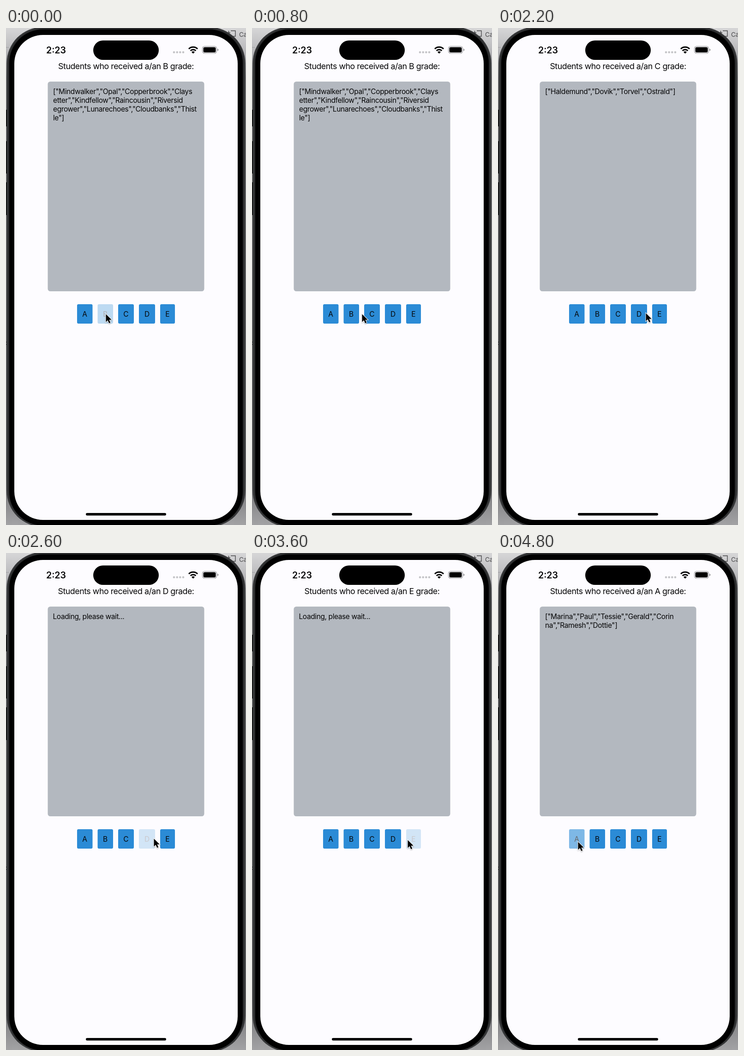
Write an HTML page that moves like this. It is 520 px wide and 1076 px high and loops after 5 s.

```html
<!DOCTYPE html>
<html lang="en">
<head>
<meta charset="utf-8">
<title>Grades</title>
<style>
  html, body { margin: 0; width: 100%; height: 100%; overflow: hidden; background: #222; }
  svg { display: block; width: 520px; height: 1076px; }
  text { font-family: Inter, "Open Sans", sans-serif; fill: #050506; white-space: pre; }
  .title text { font-size: 17.8px; letter-spacing: -.47px; text-anchor: middle; }
  .list text { font-size: 15.5px; letter-spacing: -.4px; }
  .clock { font-size: 19.5px; font-weight: 600; }
  .btn rect { fill: #2b8bd6; }
  .btn text { font-size: 15.5px; text-anchor: middle; }

  .anim, .title text, .list g { animation: 5s step-end infinite; }
  .title text, .list g { visibility: hidden; }
  #cursor { animation-name: move; }

  /* press: touch fades in, holds, releases; tap and touch are quicker */
  #b { animation-name: press; }
  #c { animation-name: press; animation-delay: -3.8s; }
  #d { animation-name: press; animation-delay: -2.6s; }
  #e { animation-name: touch; animation-delay: -1.6s; }
  #a { animation-name: tap; animation-delay: -.4s; }
  @keyframes press { 0% { opacity: .3 } 4% { opacity: .2 } 8% { opacity: .6 } 12%, 100% { opacity: 1 } }
  @keyframes touch { 0% { opacity: .3 } 4% { opacity: .2 } 8%, 100% { opacity: 1 } }
  @keyframes tap { 0% { opacity: .2 } 4% { opacity: .6 } 8%, 100% { opacity: 1 } }

  .title .b { animation-name: title-b; }
  .title .c { animation-name: title-c; }
  .title .d { animation-name: title-d; }
  .title .e { animation-name: title-e; }
  .title .a { animation-name: title-a; }
  @keyframes title-b { 0% { visibility: visible } 28%, 100% { visibility: hidden } }
  @keyframes title-c { 28% { visibility: visible } 52%, 100% { visibility: hidden } }
  @keyframes title-d { 52% { visibility: visible } 72%, 100% { visibility: hidden } }
  @keyframes title-e { 72% { visibility: visible } 92%, 100% { visibility: hidden } }
  @keyframes title-a { 92%, 100% { visibility: visible } }

  .list .wait { animation-name: wait; }
  .list .b { animation-name: list-b; }
  .list .c { animation-name: list-c; }
  .list .d { animation-name: list-d; }
  .list .e { animation-name: list-e; }
  .list .a { animation-name: list-a; }
  @keyframes wait {
    4%, 28%, 52%, 72%, 92% { visibility: visible }
    0%, 8%, 32%, 56%, 76%, 96%, 100% { visibility: hidden }
  }
  @keyframes list-b { 0%, 8% { visibility: visible } 4%, 28%, 100% { visibility: hidden } }
  @keyframes list-c { 32% { visibility: visible } 52%, 100% { visibility: hidden } }
  @keyframes list-d { 56% { visibility: visible } 72%, 100% { visibility: hidden } }
  @keyframes list-e { 76% { visibility: visible } 92%, 100% { visibility: hidden } }
  @keyframes list-a { 96%, 100% { visibility: visible } }

  @keyframes move {
    0% { transform: translate(216px, 619px) }
    16% { transform: translate(238px, 619px) }
    20% { transform: translate(253px, 620px) }
    24% { transform: translate(270px, 620px) }
    36% { transform: translate(311px, 619px) }
    40% { transform: translate(318px, 618px) }
    44% { transform: translate(320px, 617px) }
    48% { transform: translate(320px, 618px) }
    60% { transform: translate(340px, 620px) }
    64% { transform: translate(337px, 621px) }
    76% { transform: translate(298px, 620px) }
    80% { transform: translate(199px, 620px) }
    84% { transform: translate(187px, 622px) }
    88%, 100% { transform: translate(173px, 625px) }
  }
</style>
</head>
<body>
<svg viewBox="0 0 520 1076">
  <defs>
    <linearGradient id="desk" x1="0" y1="0" x2="0" y2="1">
      <stop offset="0" stop-color="#d6d6d7"/>
      <stop offset=".04" stop-color="#bdbdbf"/>
      <stop offset=".1" stop-color="#858587"/>
      <stop offset=".9" stop-color="#6c6c6e"/>
      <stop offset="1" stop-color="#a2a2a4"/>
    </linearGradient>
    <filter id="soft" x="-50%" y="-50%" width="200%" height="200%">
      <feDropShadow dx="0" dy="1.2" stdDeviation="1.2" flood-opacity=".35"/>
    </filter>
  </defs>

  <!-- desktop behind the phone -->
  <rect width="520" height="1076" fill="url(#desk)"/>
  <path d="M0 42H6" stroke="#9a9a9c"/>
  <g fill="none" stroke="#48484a" stroke-width="1.4">
    <path d="M487 6H497V18H491M479 10H486M482.500 6V13"/>
  </g>
  <text x="505" y="19" font-size="13.500" style="fill:#48484a">Ca</text>
  <path d="M0 177H2V213H0M0 245H2V315H0M0 334H2V405H0" fill="#111"/>
  <path d="M0 679H1V681H0M0 684H1V686H0" fill="#222"/>

  <!-- phone -->
  <rect x="1.500" y="-2" width="517" height="1082" rx="78" fill="#2b2c2d"/>
  <rect x="3" y="-.5" width="514" height="1079" rx="77" fill="none" stroke="#47484a"/>
  <rect x="7" y="3" width="506" height="1074" rx="73" fill="#000"/>
  <rect x="18" y="15" width="484" height="1050" rx="62" fill="#fdfcff"/>
  <rect x="189" y="27" width="142" height="42" rx="21"/>
  <rect x="173" y="1050" width="174" height="5.500" rx="2.750"/>

  <!-- status bar -->
  <text class="clock" x="87" y="54.500">2:23</text>
  <g fill="#c3c3c6">
    <circle cx="364" cy="52.500" r="2.300"/>
    <circle cx="370.700" cy="52.500" r="2.300"/>
    <circle cx="377.300" cy="52.500" r="2.300"/>
    <circle cx="384" cy="52.500" r="2.300"/>
  </g>
  <g fill="none" stroke="#000" stroke-width="3">
    <path d="M396 45.200A13.500 13.500 0 0 1 415 45.200"/>
    <path d="M399.700 49.200A8.200 8.200 0 0 1 411.300 49.200"/>
  </g>
  <path d="M405.500 55.500L402 52A5 5 0 0 1 409 52Z"/>
  <rect x="425.500" y="39.500" width="31" height="15.500" rx="5" fill="none" stroke="#9b9b9e" stroke-width="1.200"/>
  <rect x="427.500" y="41.500" width="27" height="11.500" rx="3.200"/>
  <path d="M458 44.500Q460.500 45.500 460.500 47.250T458 50Z" fill="#9b9b9e"/>

  <g class="title">
    <text class="b" x="260" y="89">Students who received a/an B grade:</text>
    <text class="c" x="260" y="89">Students who received a/an C grade:</text>
    <text class="d" x="260" y="89">Students who received a/an D grade:</text>
    <text class="e" x="260" y="89">Students who received a/an E grade:</text>
    <text class="a" x="260" y="89">Students who received a/an A grade:</text>
  </g>

  <rect x="90.500" y="116" width="339" height="454" rx="5.500" fill="#b3b8bf"/>
  <g class="list">
    <g class="wait"><text x="101.500" y="143">Loading, please wait...</text></g>
    <g class="b">
      <text x="102" y="143">["Mindwalker","Opal","Copperbrook","Clays</text>
      <text x="102" y="162">etter","Kindfellow","Raincousin","Riversid</text>
      <text x="102" y="181">egrower","Lunarechoes","Cloudbanks","Thist</text>
      <text x="102" y="200">le"]</text>
    </g>
    <g class="c"><text x="102" y="143">["Haldemund","Dovik","Torvel","Ostrald"]</text></g>
    <g class="d"><text x="102" y="143">["Jazzyowl Mover"]</text></g>
    <g class="e"><text x="102" y="143">["Haldewick","Jolly","Torvel","Ostrald"]</text></g>
    <g class="a">
      <text x="102" y="143">["Marina","Paul","Tessie","Gerald","Corin</text>
      <text x="102" y="162">na","Ramesh","Dottie"]</text>
    </g>
  </g>

  <g class="btn anim" id="a"><rect x="154" y="598" width="33.500" height="42" rx="3"/><text x="170.700" y="624.700">A</text></g>
  <g class="btn anim" id="b"><rect x="198.500" y="598" width="33.500" height="42" rx="3"/><text x="215" y="624.700">B</text></g>
  <g class="btn anim" id="c"><rect x="243" y="598" width="34" height="42" rx="3"/><text x="260" y="624.700">C</text></g>
  <g class="btn anim" id="d"><rect x="288" y="598" width="35" height="42" rx="3"/><text x="305.500" y="624.700">D</text></g>
  <g class="btn anim" id="e"><rect x="334" y="598" width="32" height="42" rx="3"/><text x="350" y="624.700">E</text></g>

  <g class="anim" id="cursor">
    <path d="M.5 .5V17.500L4.500 13.800L7.300 20.200L10.300 18.900L7.500 12.700H12.800Z"
      stroke="#fff" stroke-width="1.800" paint-order="stroke" filter="url(#soft)"/>
  </g>
</svg>
</body>
</html>
```
